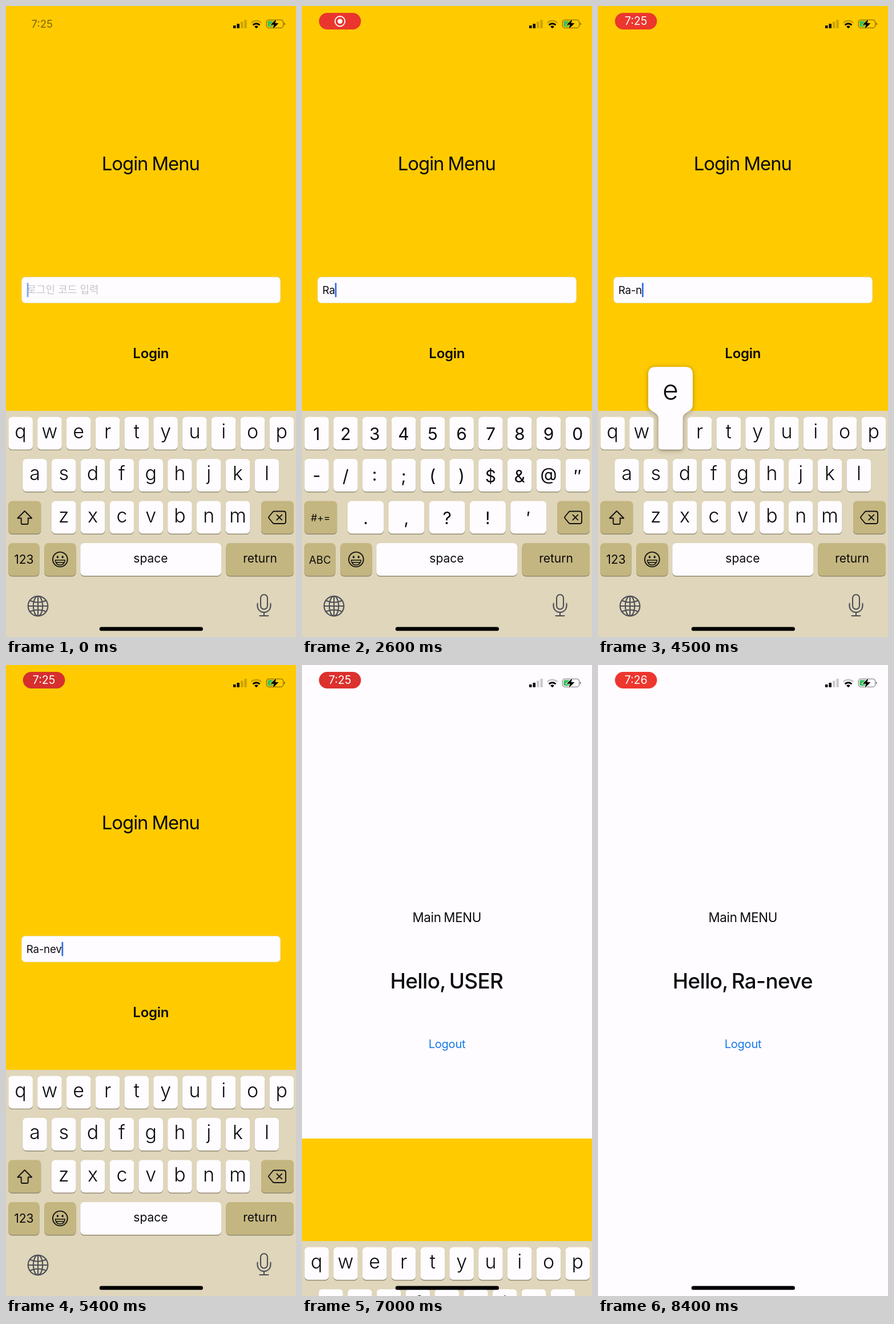
Animation of 508x1102 px, one loop 8500 ms. Source, as an HTML page:

```html
<!DOCTYPE html>
<html lang="ko">
<head>
<meta charset="utf-8">
<title>Login</title>
<style>
  html, body { margin: 0; width: 100%; height: 100%; overflow: hidden; background: #fefcff; }
  svg { display: block; width: 508px; height: 1102px; }
  text { font-family: Inter, Roboto, sans-serif; text-anchor: middle; fill: #0b0a0c; white-space: pre; }
  .left { text-anchor: start; }
  .hint { font-family: "Noto Sans CJK KR", "Noto Sans CJK", sans-serif; font-size: 18px; fill: #c6c5c8; }
  .lower { font-size: 34px; font-weight: 350; }
  .upper, .num { font-size: 30px; }
  .num { font-feature-settings: "case"; }
  .big { font-size: 48px; font-weight: 350; }
  .word { font-size: 21px; }
  .line { fill: none; stroke: #111; stroke-width: 1.9; stroke-linejoin: round; stroke-linecap: round; }
  .tool { fill: none; stroke: #4d4f57; stroke-width: 2.1; stroke-linecap: round; }
  .pop { filter: drop-shadow(0 1px 4px rgba(70, 55, 10, .45)); }
</style>
</head>
<body>
<svg viewBox="0 0 508 1102">
  <rect width="508" height="1102" fill="#fefcff"/>
  <g id="main">
    <text x="253.8" y="449" font-size="22.3" letter-spacing="-.012em" word-spacing="-.06em">Main MENU</text>
    <text id="hello" x="253.4" y="565" font-size="36.8" font-weight="500" letter-spacing="-.017em" word-spacing="-.08em"></text>
    <text x="254" y="669" font-size="20" letter-spacing="-.01em" style="fill:#1678ea">Logout</text>
  </g>
  <g id="login">
    <rect width="508" height="1102" fill="#ffcb00"/>
    <text x="253.4" y="287" font-size="32.8" letter-spacing="-.03em" word-spacing="-.04em">Login Menu</text>
    <rect x="27.3" y="473.3" width="453.4" height="45.4" rx="6.5" fill="#fefcff" stroke="#d2cfc8" stroke-width=".45"/>
    <text id="hint" class="left hint" x="36.5" y="502">로그인 코드 입력</text>
    <text id="typed" class="left" x="35.8" y="503" font-size="18.6" letter-spacing="-.01em"></text>
    <rect id="caret" y="483.5" width="2.7" height="25" rx="1" fill="#2f6be6"/>
    <text id="button" x="253.8" y="615" font-size="24" font-weight="600" letter-spacing="-.01em">Login</text>
  </g>
  <g id="board">
    <rect y="707" width="508" height="400" fill="#dfd6bb"/>
    <g id="keys"></g>
    <g class="tool">
      <circle cx="56" cy="1048" r="17.3"/>
      <ellipse cx="56" cy="1048" rx="8.2" ry="17.3"/>
      <path d="M56 1030.7V1065.3M38.7 1048H73.3M42 1038.5Q56 1044.5 70 1038.5M42 1057.5Q56 1051.5 70 1057.5"/>
      <rect x="446" y="1028" width="12" height="25.5" rx="6"/>
      <path d="M440.5 1043.5V1047.5A11.5 11.5 0 0 0 463.5 1047.5V1043.5M452 1059V1065M444.5 1065H459.5"/>
    </g>
  </g>
  <g id="status">
    <path d="M398 34h4.5v4.7h-4.5zM404.5 31h4.5v7.7h-4.5z"/>
    <path d="M411 27.5h4.5v11.2h-4.5zM417.3 24h4.5v14.7h-4.5z" opacity=".2"/>
    <path d="M438.5 39.3l-3.4-3.4a4.8 4.8 0 0 1 6.8 0z"/>
    <path d="M432.6 33.2a8.3 8.3 0 0 1 11.8 0" fill="none" stroke="#000" stroke-width="2.9"/>
    <path d="M429.6 29.5a12.6 12.6 0 0 1 17.8 0" fill="none" stroke="#000" stroke-width="2.8" opacity=".22"/>
    <rect x="456.3" y="24.3" width="29.4" height="14" rx="4" fill="none" stroke="#000" stroke-width="1.3" opacity=".45"/>
    <path d="M487 28.8q2 .8 2 2.5t-2 2.5z" opacity=".45"/>
    <rect x="458.3" y="26.3" width="11.5" height="10" rx="2" fill="#34c25c"/>
    <path id="bolt" d="M473.5 23L463.5 32.7H469.5L467.5 40L477.5 30H471.5Z" stroke-width="1.8" paint-order="stroke"/>
    <text id="clock" x="63.3" y="38" font-size="18.3" font-weight="500" style="fill:#8e7108">7:25</text>
    <g id="pill">
      <rect id="pillBg" x="29.7" y="12" width="73.6" height="29" rx="14.5"/>
      <g id="rec">
        <circle cx="66.5" cy="26.7" r="8.7" fill="none" stroke="#fff" stroke-width="1.9"/>
        <circle cx="66.5" cy="26.7" r="4.3" fill="#fff"/>
      </g>
      <text id="pillTime" x="66.5" y="33.3" font-size="19.5" style="fill:#fff"></text>
    </g>
  </g>
  <rect x="163.7" y="1084.5" width="181.3" height="6.8" rx="3.4"/>
</svg>
<script>
const LOOP = 8500, TICK = 100, NAME = "Ra-neve";
const WHITE = "#fefcff", TAN = "#c4b680", KEY_H = 57;
const $ = id => document.getElementById(id);

// time, layout, letters typed, held key
const STEPS = [
  [0, "lower", 0], [1000, "upper", 0],
  [1600, "upper", 0, "R"], [1800, "lower", 1],
  [2000, "lower", 1, "a"], [2200, "lower", 2],
  [2500, "num", 2], [3000, "num", 2, "-"], [3200, "num", 3],
  [3500, "lower", 3], [4000, "lower", 3, "n"], [4200, "lower", 4],
  [4500, "lower", 4, "e"], [4700, "lower", 5],
  [5000, "lower", 5, "v"], [5200, "lower", 6],
  [5500, "lower", 6, "e"], [5700, "lower", 7]
];
const ROWS = {
  lower: ["qwertyuiop", "asdfghjkl", "zxcvbnm"],
  upper: ["QWERTYUIOP", "ASDFGHJKL", "ZXCVBNM"],
  num: ["1234567890", "-/:;()$&@″", ".,?!′"]
};

const label = (s, x, y, cls, extra = "") =>
  `<text x="${x}" y="${y}" class="${cls}" ${extra}>${s.replace("&", "&amp;")}</text>`;

function cap(x, y, w, fill = WHITE) {
  const box = (dy, c) => `<rect x="${x}" y="${y + dy}" width="${w}" height="${KEY_H}" rx="6.5" fill="${c}"/>`;
  return box(1.4, "#928a70") + box(0, fill);
}

function popup(ch, x, y, w) {
  const l = Math.max(1, Math.min(429, x - 18)), r = l + 78;
  const top = y - 87.5, side = y - 21, neck = y + 3, foot = y + KEY_H, e = x + w;
  const d = `M${l + 13} ${top}H${r - 13}Q${r} ${top} ${r} ${top + 13}V${side}
    C${r} ${side + 13} ${e} ${neck - 13} ${e} ${neck}V${foot - 6}Q${e} ${foot} ${e - 6} ${foot}
    H${x + 6}Q${x} ${foot} ${x} ${foot - 6}V${neck}
    C${x} ${neck - 13} ${l} ${side + 13} ${l} ${side}V${top + 13}Q${l} ${top} ${l + 13} ${top}Z`;
  return `<path class="pop" d="${d}" fill="${WHITE}"/>` + label(ch, l + 39, y - 31, "big");
}

function drawKeys(layout, held) {
  const num = layout === "num", up = layout === "upper";
  let out = "", over = "";
  ROWS[layout].forEach((row, r) => {
    const wide = num && r === 2;
    const step = wide ? 71.3 : 50.8, w = wide ? 63 : 42.6;
    const x0 = r === 2 ? 80 : r === 1 && !num ? 29.2 : 4.3;
    const y = 717.7 + r * 73.4;
    [...row].forEach((ch, i) => {
      const x = x0 + i * step;
      out += cap(x, y, w);
      if (ch === held) over = popup(ch, x, y, w);
      else out += label(ch, x + w / 2, y + (layout === "lower" ? 37 : 40.5), layout);
    });
  });
  out += cap(4.2, 864.5, 57, up ? WHITE : TAN) + cap(447, 864.5, 57, TAN);
  out += num
    ? label("#+=", 32.5, 900, "", 'font-size="17.5"')
    : `<path class="line" ${up ? 'style="fill:#000"' : ""} d="M32.7 882L20.3 894.5H26.7V903.5Q26.7 905 28.2 905H37.2Q38.7 905 38.7 903.5V894.5H45.1Z"/>`;
  out += `<path class="line" d="M470 882.5H486.5Q490 882.5 490 886V900.5Q490 904 486.5 904H470Q468.5 904 467.5 903L460.5 894.5Q459.5 893.3 460.5 892L467.5 883.5Q468.5 882.5 470 882.5ZM474.3 888.7L483.3 897.7M483.3 888.7L474.3 897.7"/>`;
  out += cap(4.2, 938, 54.3, TAN) + cap(67.2, 938, 55.3, TAN) + cap(130.2, 938, 246.8) + cap(385.5, 938, 118.5, TAN);
  out += num ? label("ABC", 31.5, 973.5, "", 'font-size="18.5"') : label("123", 31.3, 974, "word");
  out += label("space", 253.4, 972, "word") + label("return", 445, 972, "word");
  out += `<circle class="line" cx="94.8" cy="966.5" r="12.9"/>
    <ellipse cx="90.4" cy="962.3" rx="1.5" ry="2.1"/><ellipse cx="99.2" cy="962.3" rx="1.5" ry="2.1"/>
    <path class="line" style="stroke-width:1.4" d="M86.3 967.7H103.3Q102.3 976.3 94.8 976.3T86.3 967.7ZM87.8 971.7H101.8"/>`;
  $("keys").innerHTML = out + over;
}

// critically damped spring
function spring(ms) {
  const k = Math.max(0, ms) * 0.01826;
  return 1 - (1 + k) * Math.exp(-k);
}

function caretAlpha(t, since) {
  if (t > 1500 && since < 500) return 1;
  const p = t % 1000;
  return p >= 100 && p <= 500 ? 1 : p === 0 || p === 600 ? 0.6 : p === 900 ? 0.3 : 0;
}

let last;
function render(t) {
  const step = STEPS.filter(s => s[0] <= t).pop();
  const [start, layout, count, held] = step;
  if (step !== last) {
    last = step;
    drawKeys(layout, held);
    $("typed").textContent = NAME.slice(0, count);
    $("hint").style.display = count ? "none" : "";
    $("caret").setAttribute("x", count ? 35.8 + $("typed").getComputedTextLength() : 36.7);
  }
  $("caret").style.opacity = held ? 1 : caretAlpha(t, t - start);
  $("button").style.opacity = t >= 6700 ? 0.2 : 1;

  const away = spring(t - 6852.4);
  $("login").setAttribute("transform", `translate(0 ${1102 * away})`);
  $("board").setAttribute("transform", `translate(0 ${398.5 * away})`);
  $("hello").textContent = "Hello, " + (t < 7400 ? "USER" : NAME);
  $("bolt").setAttribute("stroke", away > 0.03 ? WHITE : "#ffcb00");

  const shown = Math.min(1, Math.max(0, (t - 200) / 300));
  const pulse = Math.cos((t - 350) / 1000 * Math.PI);
  $("clock").style.opacity = 1 - shown;
  $("pill").style.opacity = shown;
  $("pillBg").setAttribute("fill", `rgb(${226 + 12 * pulse | 0},${51 + 4 * pulse | 0},46)`);
  $("rec").style.display = t < 3500 ? "" : "none";
  $("pillTime").textContent = t < 3500 ? "" : t < 7800 ? "7:25" : "7:26";
}

const t0 = performance.now();
function frame(now) {
  const t = Math.max(0, now - t0) % LOOP;
  render(Math.floor(t / TICK) * TICK);
  requestAnimationFrame(frame);
}
render(0);
requestAnimationFrame(frame);
</script>
</body>
</html>
```
